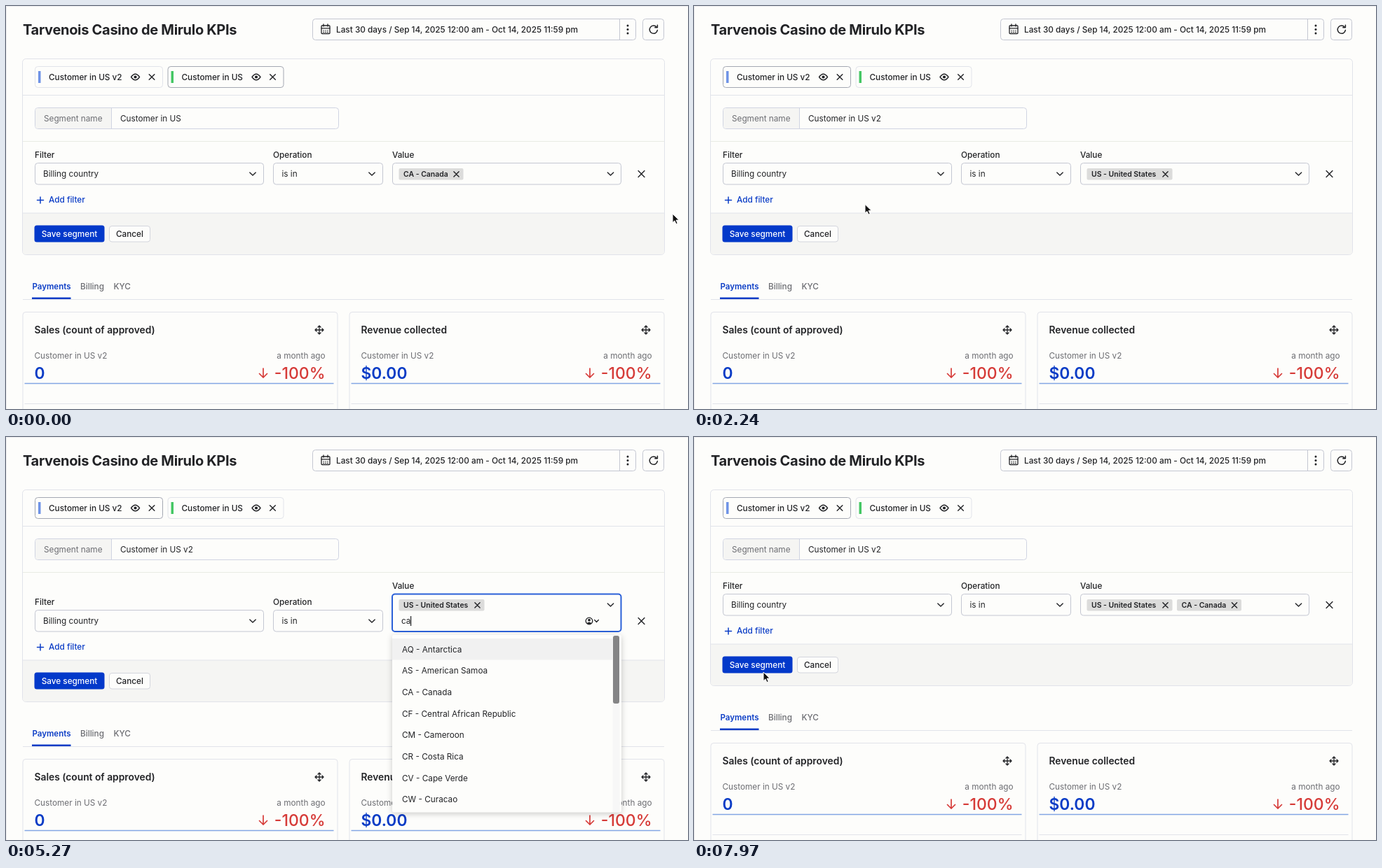
An HTML page that plays this animation: 973 px wide and 576 px high, repeating every 8000 ms.

```html
<!DOCTYPE html>
<html lang="en">
<head>
<meta charset="utf-8">
<title>Segment filters</title>
<style>
  html, body { margin: 0; width: 100%; height: 100%; overflow: hidden; background: #fdfdfb; }
  svg { display: block; width: 973px; height: 576px; font-family: Inter, sans-serif; }
</style>
</head>
<body>
<svg viewBox="0 0 973 576"><g id="page"></g><g id="cursor"></g></svg>
<script>
const INK = '#222326', GREY = '#6c6d72', BLUE = '#0a3cc6', RED = '#d63b38';
const EDGE = '#c4c7d2', FAINT = '#e1e3ea', WHITE = '#fdfdfb', TINT = '#f5f5f3';
const LOOP = 8000;

// When the interface changes, in ms.
const PICK_V2 = 850, PICK_US = 3180, PICK_V2_AGAIN = 4080;
const OPEN = 4460, TYPE_C = 4970, TYPE_A = 5120, PICK_CANADA = 6400, SAVE = 7300;

// Pointer stops: time, x, y.
const PATH = [
  [20, 951, 297], [720, 138, 100], [950, 138, 100], [1540, 244, 283.5], [2250, 244, 283.5],
  [2900, 305, 100], [3300, 305, 100], [3780, 140, 100], [4110, 140, 100],
  [4420, 720, 241], [5730, 720, 241], [6200, 606, 362], [6500, 606, 362],
  [7040, 77, 343], [7420, 77, 343], [7900, 99, 336]
];

const ALL = ['AD - Andorra', 'AE - United Arab Emirates', 'AF - Afghanistan', 'AG - Antigua and Barbuda',
  'AI - Anguilla', 'AL - Albania', 'AM - Armenia', 'AO - Angola'];
const WITH_C = ['AQ - Antarctica', 'AS - American Samoa', 'CA - Canada', 'CC - Cocos Islands',
  'CD - Congo', 'CF - Central African Republic', 'CH - Switzerland', 'CI - Ivory Coast'];
const WITH_CA = ['AQ - Antarctica', 'AS - American Samoa', 'CA - Canada', 'CF - Central African Republic',
  'CM - Cameroon', 'CR - Costa Rica', 'CV - Cape Verde', 'CW - Curacao'];

const text = (x, y, str, { size = 11.75, weight = 400, fill = INK, anchor = 'start', track = 0 } = {}) =>
  `<text x="${x}" y="${y + size * 0.36}" font-size="${size}" font-weight="${weight}" fill="${fill}" text-anchor="${anchor}" letter-spacing="${track}">${str}</text>`;
const box = (x, y, w, h, fill = WHITE, stroke = 'none', r = 4, width = 1) =>
  `<rect x="${x}" y="${y}" width="${w}" height="${h}" rx="${r}" fill="${fill}" stroke="${stroke}" stroke-width="${width}"/>`;
const line = (d, stroke = INK, width = 1.4, cap = 'round') =>
  `<path d="${d}" fill="none" stroke="${stroke}" stroke-width="${width}" stroke-linecap="${cap}" stroke-linejoin="round"/>`;
const rule = (x1, x2, y, stroke = FAINT, width = 1) => line(`M${x1} ${y}H${x2}`, stroke, width, 'butt');
const shift = (dy, ...parts) => `<g transform="translate(0 ${dy})">${parts.join('')}</g>`;

const cross = (x, y, r = 3.8) => line(`M${x - r} ${y - r}l${2 * r} ${2 * r}m0 ${-2 * r}l${-2 * r} ${2 * r}`);
const chevron = (x, y, r = 4.2) => line(`M${x - r} ${y - r / 2}l${r} ${r}l${r} ${-r}`);
const eye = (x, y) => line(`M${x - 6} ${y}q6-8.6 12 0q-6 8.6-12 0z`, INK, 1.4) +
  `<circle cx="${x}" cy="${y}" r="2.1" fill="${INK}"/>`;
const move = (x, y) => line(`M${x - 6} ${y}h12M${x} ${y - 6}v12` +
  `M${x - 2} ${y - 4}l2-2 2 2M${x - 2} ${y + 4}l2 2 2-2M${x - 4} ${y - 2}l-2 2 2 2M${x + 4} ${y - 2}l2 2-2 2`, INK, 1.3);

function header() {
  return line('M.5 576V.5H973', '#ececee', 1) +
    text(24, 34, 'Tarvenois Casino de Mirulo KPIs', { size: 20, weight: 700, track: -0.3 }) +
    box(437.5, 18.5, 461, 30, WHITE, EDGE) + line('M875.5 19V48', EDGE, 1) +
    box(450, 28, 12, 11.5, 'none', INK, 1, 1.3) +
    line('M453 26v3M459 26v3M450 31.8h12', INK, 1.3) +
    line('M452.4 35h1.6M455.2 35h1.6M458 35h1.6M452.4 37.3h1.6M455.2 37.3h1.6M458 37.3h1.6', INK, 1.2, 'butt') +
    text(471, 33.5, 'Last 30 days / Sep 14, 2025 12:00 am - Oct 14, 2025 11:59 pm', { weight: 500, size: 11.8 }) +
    [28, 33.5, 39].map(y => `<circle cx="887" cy="${y}" r="1.5" fill="${INK}"/>`).join('') +
    box(908.5, 18.5, 30, 30, WHITE, EDGE) +
    line('M928.2 30.2A5.6 5.6 0 1 0 929.4 34.4M929.4 27.2v3.6h-3.6', INK, 1.5);
}

function chip(x, w, color, label, strong) {
  return box(x + .5, 86.5, w, 30, WHITE, strong ? '#a4a8b2' : FAINT) +
    box(x + 5, 93, 3.5, 17, color, 'none', 0) + text(x + 20, 101.5, label, { weight: 500 }) +
    eye(x + w - 38.5, 101.5) + cross(x + w - 15, 101.5);
}

function tag(x, w, label) {
  return box(x, 232, w, 16.5, '#dcdcdb', 'none', 2) +
    text(x + 6.5, 240.3, label, { size: 10.45, weight: 600 }) + cross(x + w - 10, 240.3, 3.6);
}

function metric(x, title, value) {
  return box(x + .5, 437.5, 449, 180, WHITE, FAINT) +
    text(x + 17, 463, title, { size: 13.8, weight: 600 }) + move(x + 423.5, 463) +
    text(x + 17, 500, 'Customer in US v2', { fill: GREY }) +
    text(x + 432, 500, 'a month ago', { fill: GREY, anchor: 'end' }) +
    text(x + 17, 524.5, value, { size: 22.8, weight: 600, fill: BLUE }) +
    line(`M${x + 343.5} 518v13m-5.5-5.5l5.5 5.5 5.5-5.5`, RED, 1.7) +
    text(x + 432, 524.5, '-100%', { size: 23, weight: 500, fill: RED, anchor: 'end' }) +
    rule(x + 3, x + 444, 539.5, '#83a6e4', 1.3) + rule(x + 3, x + 444, 568.5);
}

function valueField(s) {
  const tags = s.us ? tag(560.5, 92, 'CA - Canada')
    : tag(560.5, 122, 'US - United States') + (s.added ? tag(689, 92, 'CA - Canada') : '');
  const frame = s.open ? box(551, 224.5, 326.5, 53.5, WHITE, '#2a60d8', 4, 2)
    : box(551.5, 224.5, 326, 30.5, WHITE, EDGE);
  const entry = !s.open ? '' :
    (s.typed ? text(564, 263, s.typed) : text(564, 263.5, 'Select Billing Country', { fill: GREY })) +
    (s.caret ? box(563.8 + s.typed.length * 6.6, 256, 1.2, 14, INK, 'none', 0) : '') +
    `<circle cx="832" cy="263" r="4.8" fill="none" stroke="${INK}" stroke-width="1.3"/>
     <circle cx="832" cy="261.6" r="1.9" fill="${INK}"/><path d="M828.6 266.2q3.4-3.6 6.8 0q-3.4 2.4-6.8 0z" fill="${INK}"/>` +
    chevron(842.5, 263, 2.8);
  return frame + tags + chevron(862.5, 240) + entry;
}

function dropdown(s) {
  const items = s.typed === 'ca' ? WITH_CA : s.typed ? WITH_C : ALL;
  const thumb = s.typed === 'ca' ? 97 : s.typed ? 50 : 17;
  return `<g style="filter:drop-shadow(0 2px 4px #0003)">${box(551, 282.5, 327, 254, WHITE, 'none', 3)}</g>` +
    box(551, 288, 314.5, 30.5, '#f1f1f1', 'none', 0) +
    (s.row > 0 ? box(551, 288 + s.row * 30.7, 314.5, 30.5, '#f1f1f1', 'none', 0) : '') +
    items.map((name, i) => text(565, 303.3 + i * 30.7, name)).join('') +
    box(865.5, 283, 10, 253, '#f7f7f7', 'none', 0) + box(866, 284, 9, thumb, '#858586', 'none', 3);
}

function page(s) {
  const dy = s.open ? 23 : 0;
  const medium = { weight: 500 };
  return header() +
    box(23.5, 75.5, 916, 280 + dy, WHITE, FAINT, 5) +
    rule(24, 939, 127.5) + rule(24, 939, 193.5, '#e9ebe4') +
    chip(41, 182, '#6f93e6', 'Customer in US v2', !s.us || s.hoverV2) +
    chip(230.5, 165, '#45c764', 'Customer in US', s.us || s.hoverUS) +
    box(41.5, 145.5, 433, 30, WHITE, '#d0d4e2') +
    `<path d="M150.5 146H45.5a3.5 3.5 0 0 0-3.5 3.5v22a3.5 3.5 0 0 0 3.5 3.5H150.5z" fill="${TINT}"/>` +
    line('M150.5 146V175', '#d0d4e2', 1) +
    text(54, 160.5, 'Segment name', { fill: GREY }) +
    text(163, 160.5, s.us ? 'Customer in US' : 'Customer in US v2') +
    text(551, 212.5, 'Value', medium) +
    shift(dy,
      text(41, 212.5, 'Filter', medium), text(381, 212.5, 'Operation', medium),
      box(41.5, 224.5, 326, 30.5, WHITE, EDGE), text(53, 240, 'Billing country'), chevron(352, 240),
      box(381.5, 224.5, 156, 30.5, WHITE, EDGE), text(393.5, 240, 'is in'), chevron(522, 240),
      cross(906.5, 240, 4.4),
      line('M44.5 277.5h9M49 273v9', BLUE, 1.5), text(61, 277, 'Add filter', { weight: 500, fill: BLUE }),
      `<path d="M24 296H939V351a4 4 0 0 1-4 4H28a4 4 0 0 1-4-4z" fill="${TINT}"/>`, rule(24, 939, 296),
      box(40.5, 313.5, 100, 24, s.hoverSave ? '#082c9b' : '#0339ca', 'none', 3.5),
      text(90.5, 325.7, 'Save segment', { weight: 500, fill: '#fff', anchor: 'middle' }),
      box(147.5, 314.5, 58, 22.5, WHITE, '#d3d5dd', 3.5),
      text(176.5, 325.7, 'Cancel', { weight: 500, anchor: 'middle' }),
      rule(24, 939, 419.5),
      text(37.5, 400.5, 'Payments', { weight: 600, fill: BLUE, size: 11.5 }),
      text(106, 400.5, 'Billing', { fill: GREY, weight: 500 }),
      text(153.5, 400.5, 'KYC', { fill: GREY, weight: 500 }),
      rule(37, 92.5, 417.7, BLUE, 2.4),
      metric(23.5, 'Sales (count of approved)', '0'),
      metric(489.5, 'Revenue collected', '$0.00')) +
    valueField(s) + (s.open ? dropdown(s) : '');
}

const ARROW = '<path d="M0 0v12.6l2.9-2.7 2.1 4.7 2.2-1-2.1-4.5h4.1z" fill="#111" stroke="#fff" stroke-linejoin="round"/>';
const HAND = '<path d="M-1.4 8.5V1.2a1.3 1.3 0 0 1 2.6 0V6l5.4 1.1q1.8.5 1.6 2.3l-.7 3.6q-.2 1-.8 2.5H.2q-.6-1.5-1.6-2.7L-4.3 9.3q-.8-1.7 1-1.5z" fill="#fff" stroke="#222" stroke-width="1.1" stroke-linejoin="round"/>';

function pointer(t) {
  const next = PATH.findIndex(p => p[0] > t);
  if (next < 1) return (next ? PATH[PATH.length - 1] : PATH[0]).slice(1);
  const [t0, x0, y0] = PATH[next - 1], [t1, x1, y1] = PATH[next];
  const u = (t - t0) / (t1 - t0), e = u * u * (3 - 2 * u);
  return [x0 + (x1 - x0) * e, y0 + (y1 - y0) * e];
}

const pageEl = document.getElementById('page'), cursorEl = document.getElementById('cursor');
let lastKey = '';

function draw(now) {
  const t = now % LOOP, [x, y] = pointer(t);
  const over = (l, top, r, b) => x >= l && x <= r && y >= top && y <= b;
  const open = t >= OPEN && t < SAVE, dy = open ? 23 : 0;
  const hidden = t >= TYPE_C && t < 5730;
  const state = {
    open,
    us: t < PICK_V2 || (t >= PICK_US && t < PICK_V2_AGAIN),
    added: t >= PICK_CANADA,
    typed: t < TYPE_C || t >= PICK_CANADA ? '' : t < TYPE_A ? 'c' : 'ca',
    caret: (t - TYPE_A) % 1000 < 500,
    hoverV2: over(41, 86, 223, 117),
    hoverUS: over(230, 86, 396, 117),
    hoverSave: over(41, 314 + dy, 140, 337 + dy) && open,
    row: open && !hidden && over(551, 288, 865, 533) ? Math.floor((y - 288) / 30.7) : -1
  };
  const key = JSON.stringify(state);
  if (key !== lastKey) pageEl.innerHTML = page(state);
  lastKey = key;

  const hand = state.hoverV2 || state.hoverUS || state.hoverSave || state.row >= 0;
  cursorEl.innerHTML = hidden ? '' : `<g transform="translate(${x} ${y})">${hand ? HAND : ARROW}</g>`;
}

const start = performance.now();
function tick() {
  draw(performance.now() - start);
  requestAnimationFrame(tick);
}
tick();
</script>
</body>
</html>
```
